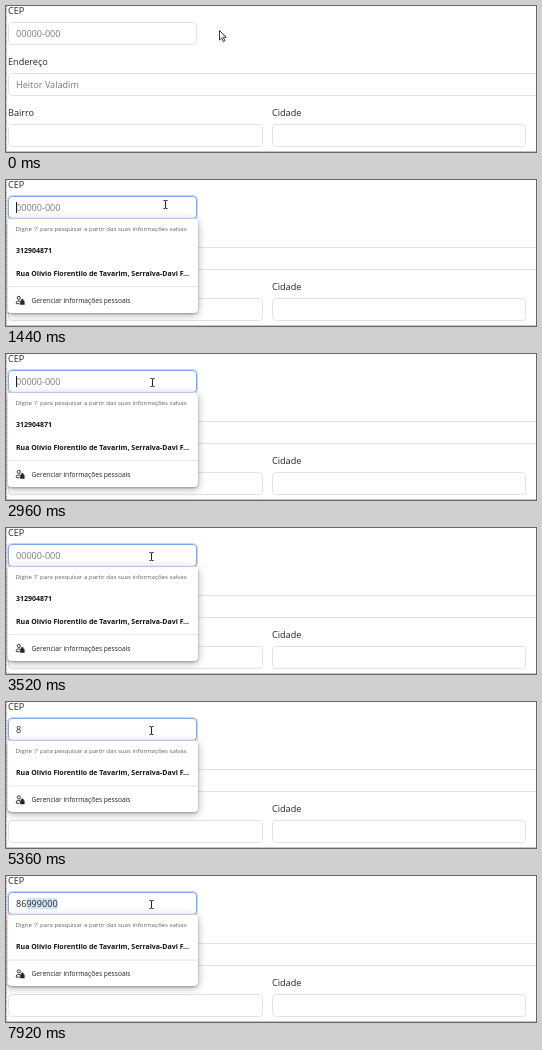
Animation of 530x146 px, one loop 8 s. Source, as an HTML page:

```html
<!DOCTYPE html>
<html lang="pt-BR">
<head>
<meta charset="utf-8">
<title>CEP</title>
<style>
html, body { margin: 0; width: 100%; height: 100%; overflow: hidden; background: #fff; }
svg { display: block; font: 9.1px "Open Sans", "Noto Sans", sans-serif; fill: #212529; }
.box { fill: #fff; stroke: #e0e3e7; }
.hold { fill: #757a80; }
.hint { font-size: 6.1px; fill: #606060; }
.bold { font-size: 7px; font-weight: 700; fill: #111; }
.item { font-size: 6.65px; fill: #222; }
#popup { filter: drop-shadow(0 1px 1.2px rgba(0, 0, 0, .3)) drop-shadow(0 2px 4px rgba(0, 0, 0, .28)); }
</style>
</head>
<body>
<svg width="530" height="146" viewBox="0 0 530 146">
  <path d="M.5 0V146" stroke="#d98080" stroke-dasharray="1 1"/>
  <path d="M0 145.5H530" stroke="#c4c4c4"/>

  <text x="2" y="8">CEP</text>
  <text x="2" y="59">Endereço</text>
  <text x="2" y="110">Bairro</text>
  <text x="266" y="110">Cidade</text>

  <rect id="ring" x="1.5" y="15.5" width="190" height="24" rx="4" fill="none" stroke="#c2d8fb"/>
  <rect id="cep" class="box" x="2.5" y="16.5" width="188" height="22" rx="3.5"/>
  <rect class="box" x="2.5" y="67.5" width="540" height="22" rx="3.5"/>
  <rect class="box" x="2.5" y="118.5" width="254" height="22" rx="3.5"/>
  <rect class="box" x="266.5" y="118.5" width="253" height="22" rx="3.5"/>

  <rect id="selection" x="20.4" y="22" width="31.2" height="11" fill="#d4e3f7"/>
  <text id="value" x="10" y="31"></text>
  <path id="caret" d="M.5 22V33" stroke="#222"/>
  <text class="hold" x="10" y="82">Heitor Valadim</text>

  <g id="popup">
    <rect id="panel" x="1.5" y="38.5" width="190.5" rx="4" fill="#fff"/>
    <text class="hint" x="9.5" y="51.3">Digite '/' para pesquisar a partir das suas informações salvas</text>
    <text id="number" class="bold" x="10" y="73">312904871</text>
    <text id="street" class="bold" x="10">Rua Olívio Florentilo de Tavarim, Serralva-Davi F...</text>
    <g id="manage">
      <path d="M1.5-16H192" stroke="#e6e6e6"/>
      <circle cx="12.8" cy="-4.6" r="1.6" fill="none" stroke="#222" stroke-width=".9"/>
      <path d="M13.5 1.2H10.3V0Q10.3-1.4 11.6-1.4H14" fill="none" stroke="#222" stroke-width=".9"/>
      <path d="M14.3-1.2H18.3V2H14.3ZM15.2-1.2V-2.2a1.1 1.1 0 0 1 2.2 0V-1.2" stroke="#222" stroke-width=".5"/>
      <text class="item" x="25.5" y="0">Gerenciar informações pessoais</text>
    </g>
  </g>

  <path id="arrow" d="M0 0V9.5L2.2 7.4L3.8 11L5.4 10.3L3.8 6.8H6.8Z" fill="#fff" stroke="#222" stroke-width=".9"/>
  <path id="beam" d="M-2-4H-.5M.5-4H2M0-4V4M-2 4H-.5M.5 4H2" fill="none" stroke="#222"/>
</svg>
<script>
const LOOP = 8000, STEP = 80;
const FOCUS = 360, TYPED = 4720, FILTERED = 4960, COMPLETED = 5600;
const PATH = [[0, 213, 24], [80, 213, 24], [320, 166, 23], [1440, 159, 24],
  [2000, 159, 24], [2480, 153, 27], [3120, 145, 28], [LOOP, 145, 28]];

const $ = id => document.getElementById(id);
const set = (id, attrs) => {
  for (const key in attrs) $(id).setAttribute(key, attrs[key]);
};
const show = (id, on) => set(id, { visibility: on ? "visible" : "hidden" });
const ramp = (t, from, to) => Math.min(1, Math.max(0, (t - from) / (to - from)));

function pointerAt(t) {
  const i = PATH.findIndex(p => p[0] > t);
  const [t0, x0, y0] = PATH[i - 1], [t1, x1, y1] = PATH[i];
  const k = ramp(t, t0, t1), e = k * k * (3 - 2 * k);
  return [x0 + (x1 - x0) * e, y0 + (y1 - y0) * e].map(Math.round);
}

function draw(t) {
  const focused = t >= FOCUS, typed = t >= TYPED;
  const filtered = t >= FILTERED, completed = t >= COMPLETED;

  show("ring", focused);
  $("cep").style.stroke = focused ? "#7fa9ee" : "";
  $("value").textContent = completed ? "86999000" : typed ? "8" : "00000-000";
  $("value").classList.toggle("hold", !typed);
  show("selection", completed);

  const blink = (t - (typed ? TYPED : FOCUS)) % 1060 < 530;
  show("caret", focused && !completed && blink);
  set("caret", { transform: `translate(${typed ? 15 : 10} 0)` });

  const open = t < 2200
    ? ramp(t, 400, 560) - ramp(t, 1900, 2020)
    : ramp(t, 2390, 2510);
  const scale = .92 + .08 * open;
  set("popup", {
    opacity: open,
    transform: `translate(96.5 86) scale(${scale}) translate(-96.5 -86)`
  });
  set("panel", { height: filtered ? 71.5 : 94.5 });
  show("number", !filtered);
  set("street", { y: filtered ? 73 : 95.5 });
  set("manage", { transform: `translate(0 ${filtered ? 100 : 122.5})` });

  const [x, y] = pointerAt(t), inside = x < 191;
  const transform = `translate(${x + .5} ${y + .5})`;
  show("arrow", !inside);
  show("beam", inside);
  set("arrow", { transform });
  set("beam", { transform });
}

function tick() {
  draw(Math.floor(performance.now() % LOOP / STEP) * STEP);
  requestAnimationFrame(tick);
}
tick();
</script>
</body>
</html>
```
